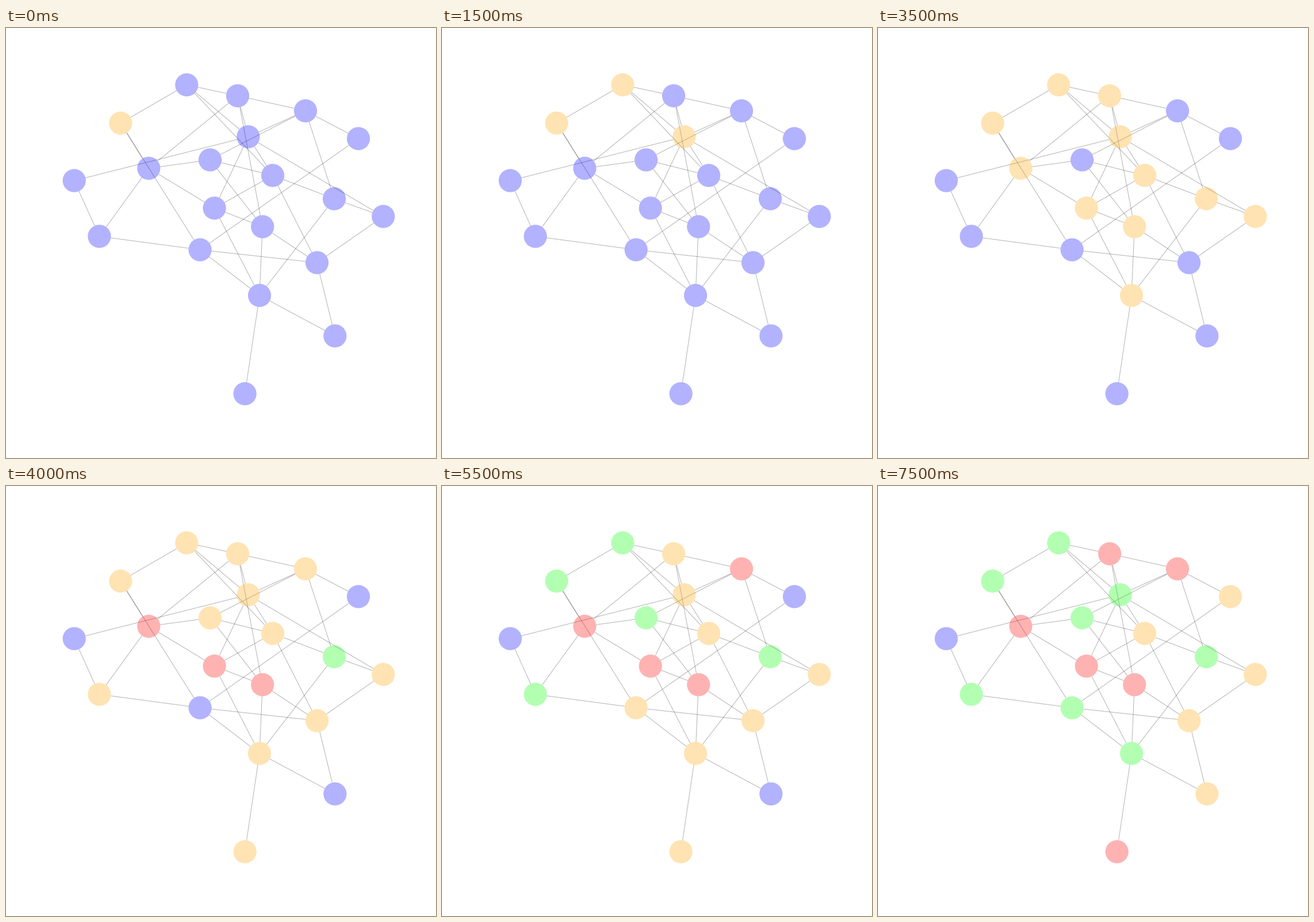
Recreate the animation shown at these times as a matplotlib script. Size 748 px wide and 748 px high, loop 8000 ms.

```python
import numpy as np
import matplotlib.pyplot as plt
from matplotlib.animation import FuncAnimation
from matplotlib.collections import LineCollection, PatchCollection
from matplotlib.patches import Circle

SIZE = 748
RADIUS = 20.1
ALPHA = 0.3
STEP_MS = 500
STEPS = 16

NODES = {
    "A": (314.3, 98.9), "B": (403, 117.9), "C": (521, 144.1), "D": (613, 192.4),
    "E": (199.4, 165.4), "F": (421.4, 189.2), "G": (355, 229.4), "H": (464, 256.5),
    "I": (248.3, 244), "J": (118.7, 265.5), "K": (571, 297), "L": (656.3, 327.8),
    "M": (362.6, 313.3), "N": (446.2, 345.6), "O": (162.4, 362.4), "P": (337.6, 385.8),
    "Q": (541, 408.2), "R": (441, 465.2), "S": (572.3, 535.6), "T": (415.6, 636.2),
}
NAMES = list(NODES)

EDGES = """AE AB AF AH BF BH BN BC BI CD CK CF CG DP EI EP FJ FL FM FH GI GH GN
           HK HM HQ IO IM JO KR KL LQ MN MR NQ NR OP PQ PR QS RS RT""".split()
EDGES.remove("BH")  # B reaches H only through F

# step at which nodes become infected (i), recovered (r) or dead (d)
EVENTS = {
    0: {"i": "E"},
    1: {"i": "A"},
    3: {"i": "F"},
    4: {"i": "H"},
    5: {"i": "BKL"},
    6: {"i": "MN"},
    7: {"i": "IR"},
    8: {"i": "CGOQT", "r": "K", "d": "IMN"},
    9: {"i": "P", "r": "A", "d": "C"},
    10: {"r": "E"},
    11: {"r": "GO"},
    12: {"d": "T"},
    13: {"i": "D", "d": "B"},
    14: {"r": "F"},
    15: {"i": "S", "r": "PR"},
}
COLORS = {"s": "#0000ff", "i": "#ffa500", "r": "#00ff00", "d": "#ff0000"}


def states_at(step):
    state = dict.fromkeys(NAMES, "s")
    for k in range(step + 1):
        for new, group in EVENTS.get(k, {}).items():
            state.update(dict.fromkeys(group, new))
    return state


def trimmed(edge):
    """Segment between two nodes, ending at their rims."""
    p, q = (np.array(NODES[n], float) for n in edge)
    rim = (q - p) / np.linalg.norm(q - p) * RADIUS
    return p + rim, q - rim


fig = plt.figure(figsize=(SIZE / 100, SIZE / 100), dpi=100, facecolor="white")
ax = fig.add_axes([0, 0, 1, 1])
ax.set_xlim(0, SIZE)
ax.set_ylim(SIZE, 0)
ax.axis("off")

ax.add_collection(LineCollection([trimmed(e) for e in EDGES], colors="black",
                                 linewidths=0.72, alpha=ALPHA, zorder=1))
dots = PatchCollection([Circle(NODES[n], RADIUS) for n in NAMES],
                       linewidths=0, alpha=ALPHA, zorder=2)
ax.add_collection(dots)


def draw(step):
    state = states_at(step)
    dots.set_facecolor([COLORS[state[n]] for n in NAMES])
    return [dots]


anim = FuncAnimation(fig, draw, frames=STEPS, interval=STEP_MS,
                     repeat=True, repeat_delay=0, blit=False)
plt.show()
```
